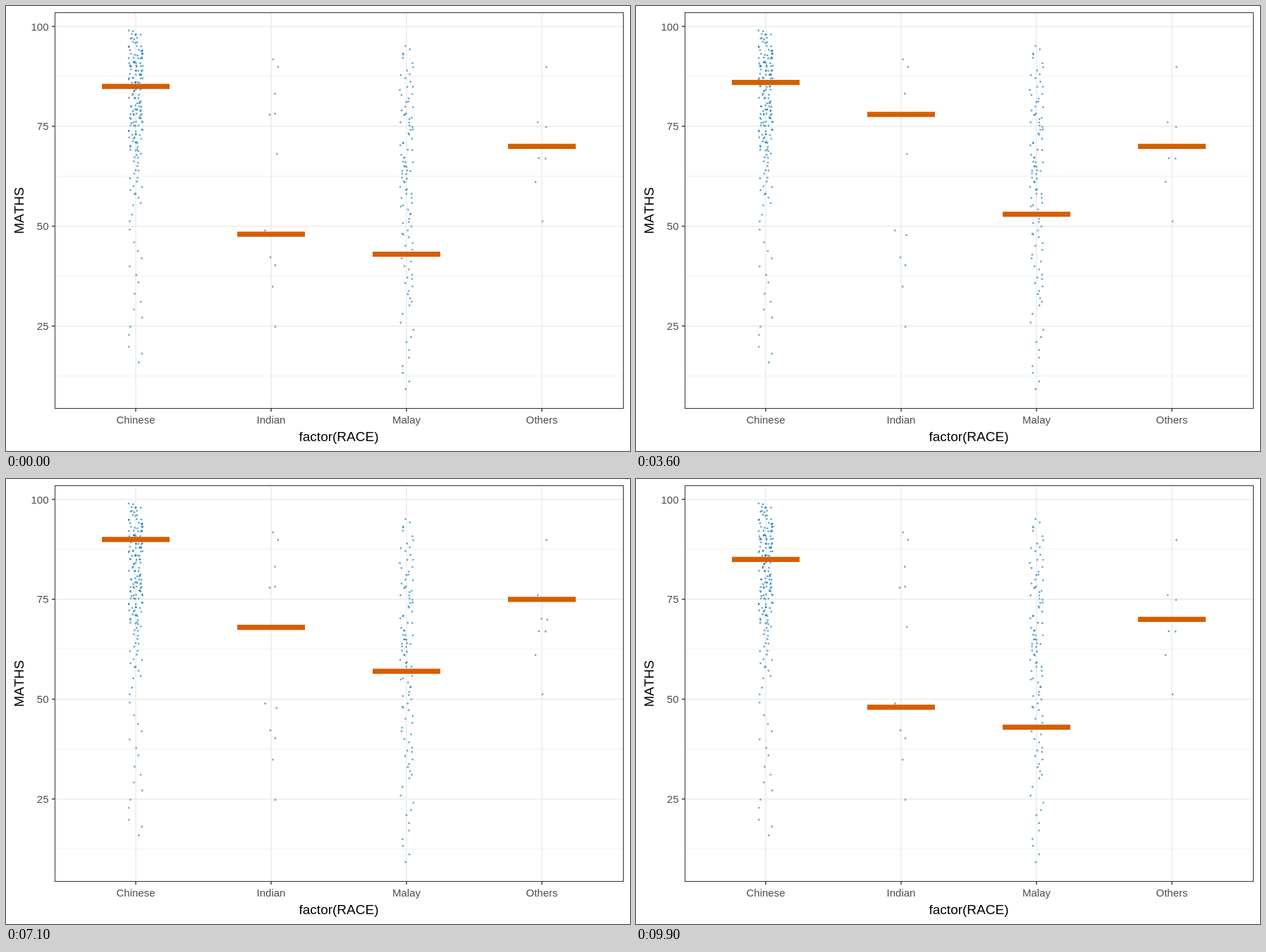
Animation, 885 px wide and 632 px high, one loop 10000 ms. Source, as an HTML page:

```html
<!DOCTYPE html>
<html lang="en">
<head>
<meta charset="utf-8">
<title>Maths scores by group</title>
<style>
  html, body { margin: 0; width: 100%; height: 100%; overflow: hidden; background: #fff; }
  svg { display: block; width: 885px; height: 632px; }
  text { font-family: "Liberation Sans", Arial, sans-serif; font-size: 15px; font-kerning: none; fill: #4d4d4d; }
  .title { font-size: 19px; fill: #000; }
  .mid { text-anchor: middle; }
  .end { text-anchor: end; }
</style>
</head>
<body>
<svg id="stage" viewBox="0 0 885 632" xmlns="http://www.w3.org/2000/svg"></svg>
<script>
// quantiles: scores at even steps from best to worst; draws: bar value per step
const groups = [
  { name: 'Chinese', count: 185, quantiles: [99, 94, 91, 88, 85, 80, 77, 73, 68, 56, 16],
    draws: [85, 87, 95, 99, 74, 73, 77, 91, 81, 86, 79, 91, 64, 39, 85, 63, 74, 80, 90, 78, 71, 36, 79, 74, 90] },
  { name: 'Indian', count: 12, quantiles: [92, 90, 83, 78, 78, 68, 49, 48, 42, 40, 35, 25],
    draws: [48, 78, 40, 35, 40, 49, 78, 83, 92, 78, 48, 40, 78, 48, 68, 42, 40, 48, 68, 42, 35, 42, 48, 68, 49] },
  { name: 'Malay', count: 110, quantiles: [95, 86, 79, 74, 67, 63, 57, 50, 40, 30, 9],
    draws: [43, 65, 79, 52, 31, 58, 70, 79, 9, 53, 19, 65, 44, 21, 65, 58, 62, 43, 57, 60, 76, 30, 21, 58, 65] },
  { name: 'Others', count: 9, quantiles: [90, 76, 75, 70, 70, 67, 67, 61, 51],
    draws: [70, 67, 70, 70, 67, 61, 67, 67, 75, 70, 67, 76, 90, 70, 90, 90, 70, 67, 75, 70, 67, 51, 51, 67, 61] }
];
const stage = document.getElementById('stage');
const panel = { x: 69.5, y: 9.5, w: 806, h: 562 };
const right = panel.x + panel.w, bottom = panel.y + panel.h;
const majors = [100, 75, 50, 25];
const scoreY = v => 29 + (100 - v) * 5.673;
const groupX = i => 184 + i * 192;
const mixed = (a, b, t) => a + (b - a) * t;

function add(tag, attrs, content, parent = stage) {
  const el = document.createElementNS('http://www.w3.org/2000/svg', tag);
  for (const key in attrs) el.setAttribute(key, attrs[key]);
  if (content) el.textContent = content;
  parent.appendChild(el);
  return el;
}

const line = (x1, y1, x2, y2, stroke, width) =>
  add('line', { x1, y1, x2, y2, stroke, 'stroke-width': width });

let seed = 11;
function random() {
  seed = (seed * 16807) % 2147483647;
  return seed / 2147483647;
}
const jitter = range => (random() * 2 - 1) * range;

function quantile(list, u) {
  const pos = u * (list.length - 1);
  const i = Math.min(Math.floor(pos), list.length - 2);
  return mixed(list[i], list[i + 1], pos - i);
}

// Grid
for (const v of majors) line(panel.x, scoreY(v - 12.5), right, scoreY(v - 12.5), '#ebebeb', 0.75);
for (const v of majors) line(panel.x, scoreY(v), right, scoreY(v), '#ebebeb', 1.45);
groups.forEach((g, i) => line(groupX(i), panel.y, groupX(i), bottom, '#ebebeb', 1.45));

// Jittered whole scores
const dots = add('g', { fill: '#0072b2', 'fill-opacity': 0.62 });
groups.forEach((g, i) => {
  for (let k = 0; k < g.count; k++) {
    const score = Math.round(quantile(g.quantiles, k / (g.count - 1)));
    add('circle', { cx: groupX(i) + jitter(10), cy: scoreY(score + jitter(0.25)), r: 1.35 }, '', dots);
  }
});

const bars = groups.map((g, i) =>
  add('rect', { x: groupX(i) - 48, width: 96, height: 7.3, fill: '#d55e00' }));

// Frame, ticks and labels
add('rect', { x: panel.x, y: panel.y, width: panel.w, height: panel.h, fill: 'none', stroke: '#333' });
for (const v of majors) {
  line(65, scoreY(v), 69, scoreY(v), '#333', 1.4);
  add('text', { x: 60.5, y: scoreY(v) + 5.6, class: 'end' }, String(v));
}
groups.forEach((g, i) => {
  line(groupX(i), 572, groupX(i), 576, '#333', 1.4);
  add('text', { x: groupX(i), y: 592.5, class: 'mid' }, g.name);
});
add('text', { x: 472, y: 618, class: 'title mid' }, 'factor(RACE)');
add('text', { transform: 'translate(25 290.5) rotate(-90)', class: 'title mid' }, 'MATHS');

// Each draw rests for three ticks, then passes halfway to the next;
// the middle draw rests one tick less.
function render(ms) {
  const tick = Math.floor((ms % 10000) / 100);
  const step = tick < 50 ? tick : tick + 1;
  const index = Math.floor(step / 4);
  const mix = step % 4 === 3 ? 0.5 : 0;
  groups.forEach(({ draws }, i) => {
    const value = mixed(draws[index % draws.length], draws[(index + 1) % draws.length], mix);
    bars[i].setAttribute('y', scoreY(value) - 3.5);
  });
}

let start;
function loop(now) {
  if (start === undefined) start = now;
  render(now - start);
  requestAnimationFrame(loop);
}
render(0);
requestAnimationFrame(loop);
</script>
</body>
</html>
```
